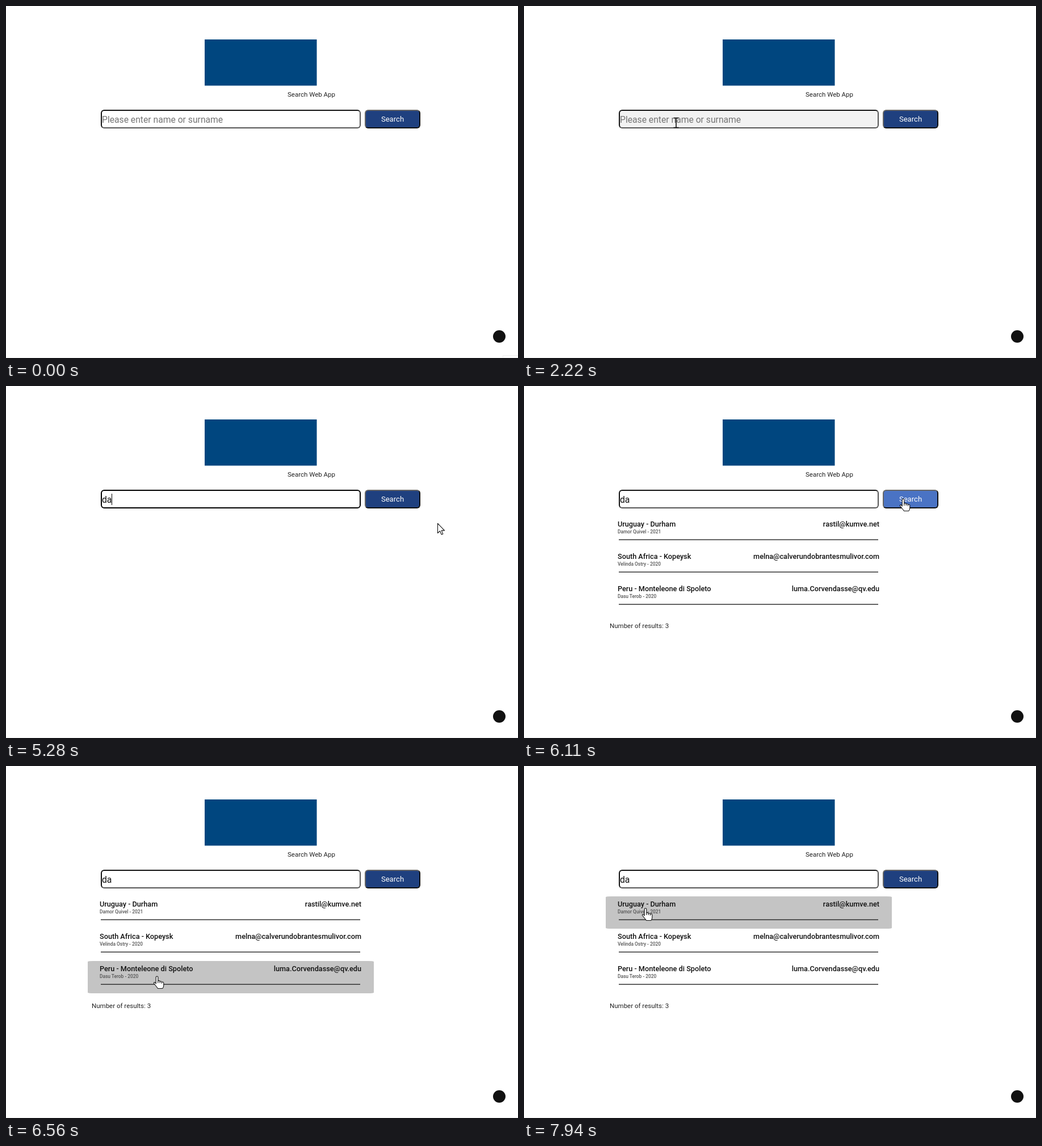
These frames come from a looping animation (902 by 621 pixels, 8000 ms). An HTML page:

```html
<!DOCTYPE html>
<html lang="en">
<head>
<meta charset="utf-8">
<title>Search Web App</title>
<style>
  html, body { margin: 0; width: 100%; height: 100%; overflow: hidden; background: #fff; }
  body { position: relative; }
  div { position: absolute; top: 183px; height: 33px; box-sizing: border-box; border: 2px solid; border-radius: 6px; }
  #field { left: 167px; width: 458px; border-color: #111 #555 #555 #111; }
  #field.hover { background: #f2f2f2; }
  #field.focus { border-color: #000; }
  #button { left: 632px; width: 98px; background: #1f407f; border-color: #666 #111 #111 #666; }
  #button.hover { background: #4a73c4; }
  svg { position: absolute; left: 0; top: 0; font: 11.5px Roboto, sans-serif; fill: #222; }
  .input { font-size: 15.7px; }
  .title { font-size: 12.7px; font-weight: 500; fill: #111; }
  .sub { font-size: 8.4px; font-weight: 500; fill: #555; }
  .end { text-anchor: end; }
  .pointer { fill: #fff; stroke: #111; stroke-width: 1.1; stroke-linejoin: round; }
</style>
</head>
<body>
<div id="field"></div>
<div id="button"></div>
<svg width="902" height="621">
  <rect x="350" y="59" width="197.500" height="81.500" fill="#00467f"/>
  <circle cx="869" cy="583" r="11" fill="#111"/>
  <path d="M0 620.500H902" stroke="#f0f0f0"/>
  <path id="corner" d="M875.500 621V616.500H902" fill="none" stroke="#eee"/>
  <text x="496" y="160">Search Web App</text>
  <text id="hint" class="input" x="169" y="205.500" fill="#757575">Please enter name or surname</text>
  <text id="typed" class="input" x="169" y="205.500" fill="#111"></text>
  <rect id="caret" y="190" width="1" height="20" fill="#000"/>
  <text x="681" y="204" text-anchor="middle" font-size="13.1" fill="#fff">Search</text>
  <g id="results"></g>
  <g id="cursor">
    <path id="arrow" class="pointer" d="M0 0V17l4-3.700 2.700 6.200 2.600-1.100-2.600-6h5.300z"/>
    <g id="hand" class="pointer">
      <path d="M-1.800 13V1.800a1.800 1.800 0 0 1 3.600 0V8q2.600-1 3.400 1 2.400-.7 3.200 1.200 3.200-.8 3.400 2V16q0 3-2 5.500H1.500Q-1 18-5.500 12.500q-.3-2.400 1.900-1.700z"/>
      <path d="M1.800 8v4M5.200 9v3M8.400 10.200v2.500" fill="none"/>
    </g>
    <path id="beam" d="M-4.500-8.500H4.500M0-8.500V8.500M-4.500 8.500H4.500" fill="none" stroke="#111" stroke-width="1.600"/>
  </g>
</svg>
<script>
const LOOP = 8000, STEP = 92.4;
const $ = id => document.getElementById(id);
const show = (id, on) => { $(id).style.display = on ? '' : 'none'; };
const within = (v, a, b) => v >= a && v < b;

const people = [
  ['Uruguay - Durham', 'Damor Quivel - 2021', 'rastil@kumve.net'],
  ['South Africa - Kopeysk', 'Velinda Ostry - 2020', 'melna@calverundobrantesmulivor.com'],
  ['Peru - Monteleone di Spoleto', 'Dasu Terob - 2020', 'luma.Corvendasse@qv.edu']
];
$('results').innerHTML = people.map(([place, person, mail], i) => `
  <g transform="translate(0 ${i * 57})">
    <rect id="row${i}" x="144" y="230" width="504" height="57" rx="10" ry="1.2" fill="#c4c4c4"/>
    <text class="title" x="165" y="247.5">${place}</text>
    <text class="sub" x="165" y="260">${person}</text>
    <text class="title end" x="626" y="247.5">${mail}</text>
    <path d="M167 271.2H624" stroke="#333" stroke-width="1.4"/>
  </g>`).join('') + '<text x="151" y="427">Number of results: 3</text>';

// Pointer path: time, x, y of the hot spot
const path = [
  [530, 880, 590], [980, 470, 205], [1210, 330, 83], [1390, 310, 100], [1670, 270, 215],
  [1760, 268, 215.9], [1850, 268, 215.9], [1950, 268, 211], [2040, 268, 211], [2130, 268, 209],
  [2220, 268, 206], [4740, 268, 206], [5010, 600, 225], [5190, 849, 281], [5370, 672, 204],
  [5840, 672, 204], [6110, 668, 199], [6290, 450, 250], [6380, 310, 283], [6470, 285, 327],
  [6560, 266, 371], [6660, 253, 388], [6920, 251, 397], [7010, 251, 397], [7100, 235, 415.5],
  [7850, 213, 261], [7940, 214, 251], [LOOP, 214, 251]
];

function pointerAt(t) {
  const i = path.findIndex(p => p[0] > t);
  if (i < 1) return [-99, -99];
  const [t0, x0, y0] = path[i - 1], [t1, x1, y1] = path[i];
  const n = Math.max(1, Math.round((t1 - t0) / STEP));
  const k = Math.floor((t - t0) / (t1 - t0) * n) / n;
  return [x0 + (x1 - x0) * k, y0 + (y1 - y0) * k];
}

function draw(now) {
  const t = now % LOOP;
  const [x, y] = pointerAt(t);
  const found = t >= 5650;
  const onLine = within(y, 183, 216);
  const onField = onLine && within(x, 167, 625);
  const onButton = onLine && within(x, 632, 730);
  const row = found && within(x, 144, 648) ? Math.floor((y - 230) / 57) : -1;
  const onRow = within(row, 0, 3);
  const typed = t < 3790 ? '' : t < 4060 ? 'd' : 'da';

  $('field').className = (onField ? 'hover ' : '') + (within(t, 3240, 5560) ? 'focus' : '');
  $('button').className = onButton ? 'hover' : '';
  $('typed').textContent = typed;
  $('caret').setAttribute('x', [169, 177.5, 186][typed.length]);
  show('caret', within(t, 3240, 3610) || within(t, 3790, 4460) || within(t, 4920, 5370));
  show('hint', !typed);
  show('corner', t < 530);
  show('results', found);
  people.forEach((_, i) => show('row' + i, i === row));

  $('cursor').setAttribute('transform', `translate(${x} ${y})`);
  show('beam', onField);
  show('hand', onButton || onRow);
  show('arrow', !onField && !onButton && !onRow);
}

const start = performance.now();
function loop() {
  draw(performance.now() - start);
  requestAnimationFrame(loop);
}
loop();
</script>
</body>
</html>
```
